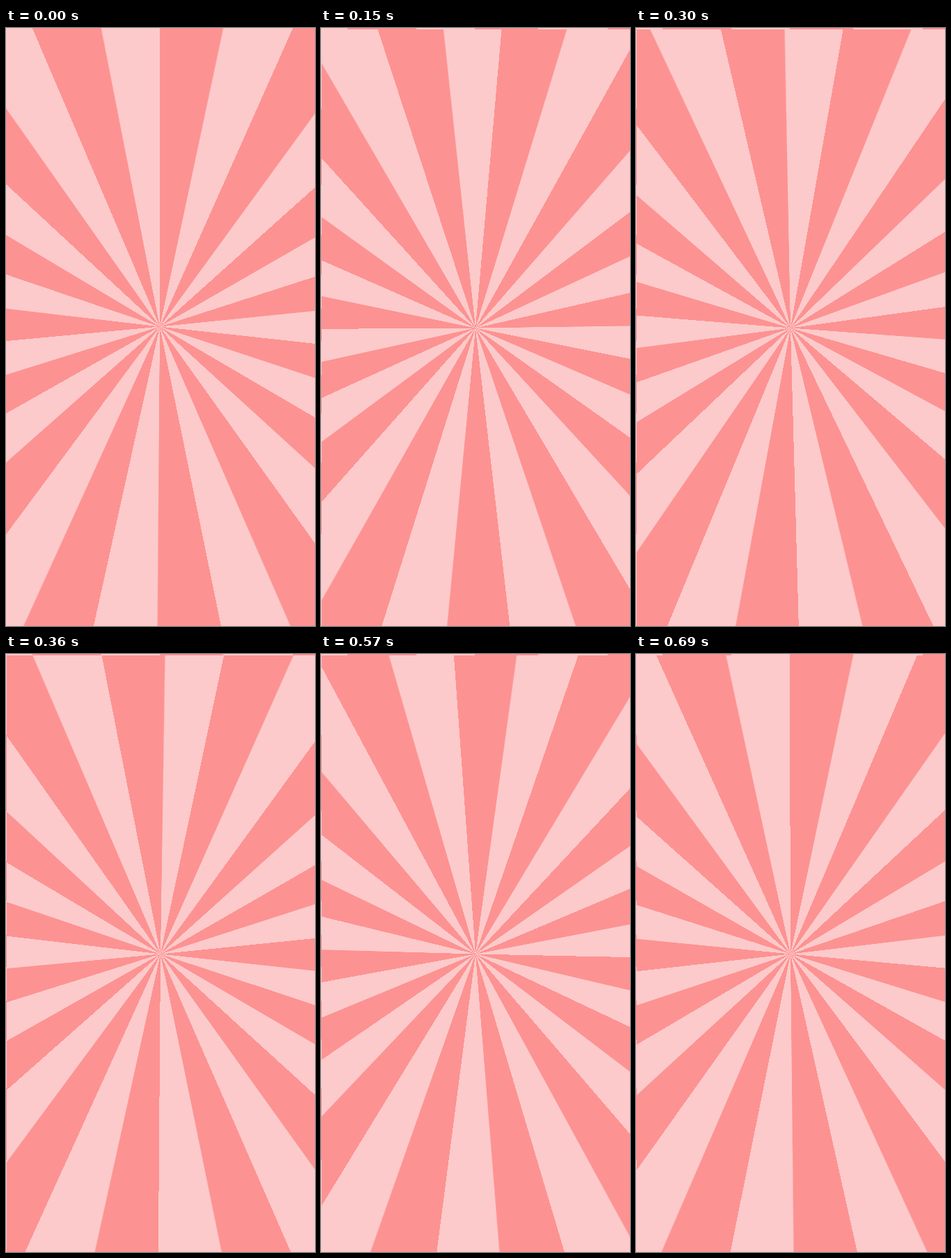
Recreate the animation shown at these times as an HTML page. Size 444 by 858 pixels, loop 0.72 s.

```html
<!DOCTYPE html>
<html lang="en">
<head>
<meta charset="utf-8">
<title>Sunburst</title>
<style>
  html, body {
    margin: 0;
    width: 100%;
    height: 100%;
    overflow: hidden;
  }
  body {
    position: relative;
    background: #fccaca;
  }
  .rays {
    --turn: 0deg;
    position: absolute;
    inset: 0;
    background: repeating-conic-gradient(
      from var(--turn) at 221px 428.5px,
      #fd9292 0deg 11.9deg,
      #fccaca 12.16deg 24.06deg
    );
  }
  /* The turning layer leaves a thin still strip at the top and left. */
  #spin {
    left: 1px;
    top: 2px;
    visibility: hidden;
  }
</style>
</head>
<body>
<div class="rays"></div>
<div class="rays" id="spin"></div>
<script>
  const LOOP = 720;
  const STEP = 30;
  const DEG_PER_STEP = 1;
  const spin = document.getElementById('spin');
  const start = performance.now();

  function draw(ms) {
    const step = Math.floor((ms % LOOP) / STEP);
    spin.style.visibility = step ? 'visible' : 'hidden';
    spin.style.setProperty('--turn', step * DEG_PER_STEP + 'deg');
  }

  function tick() {
    draw(Math.max(0, performance.now() - start));
    requestAnimationFrame(tick);
  }

  tick();
</script>
</body>
</html>
```
